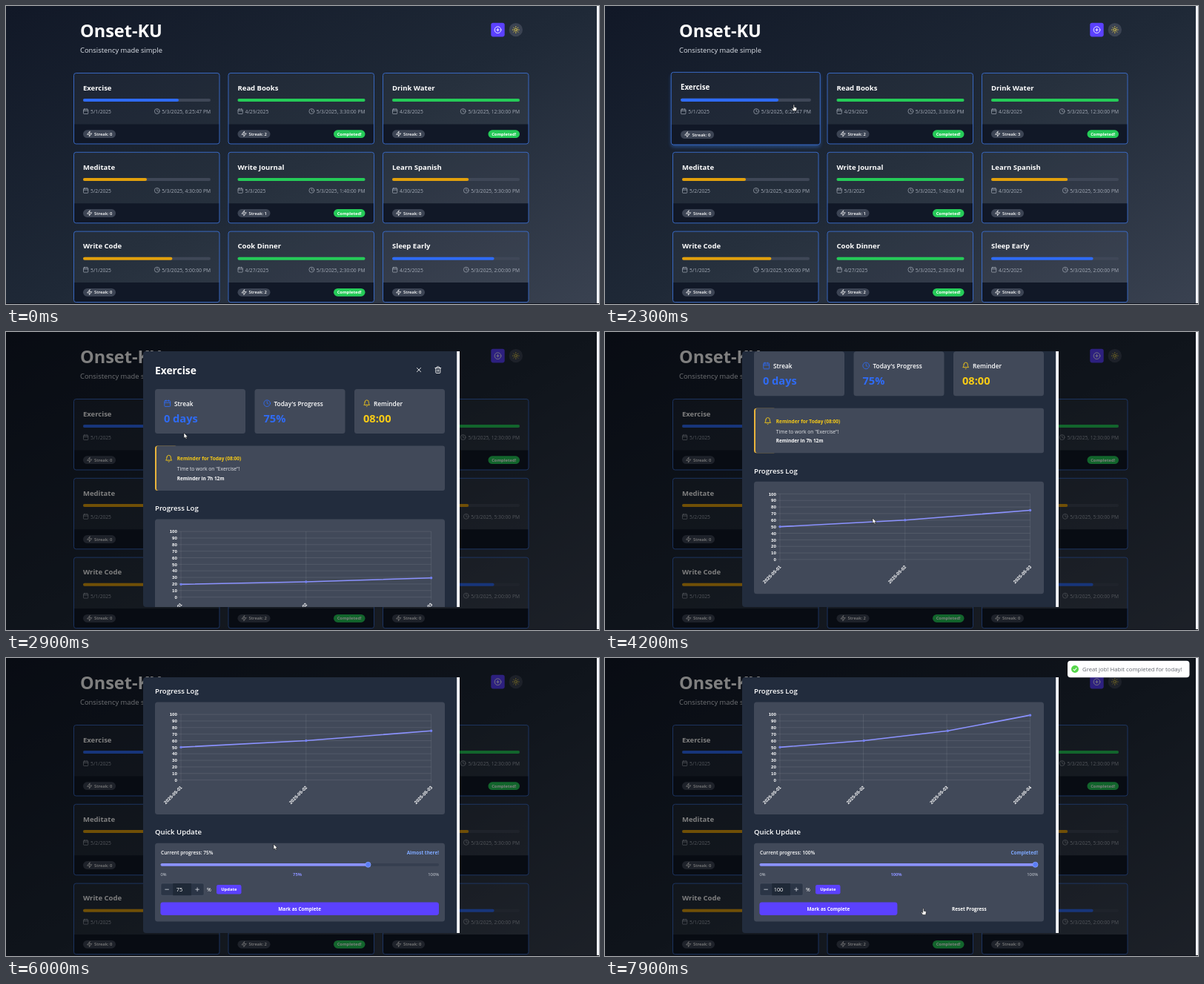
Write an HTML page that moves like this. It is 800 px wide and 402 px high and loops after 8 s.

```html
<!DOCTYPE html>
<html lang="en">
<head>
<meta charset="utf-8">
<title>Habit tracker</title>
<style>
html, body { margin: 0; width: 100%; height: 100%; overflow: hidden; background: #111827; }
#stage { position: relative; width: 800px; height: 402px; overflow: hidden; }
#page { position: absolute; width: 797px; height: 425px;
  background: linear-gradient(to bottom right, #111827, #1f2937 50%, #3b4352); }
svg { position: absolute; left: 0; top: 0; display: block; }
text { font-family: 'Open Sans', 'Noto Sans', sans-serif; white-space: pre; }
.axis text { font-family: 'Liberation Sans', Arial, sans-serif; }
</style>
</head>
<body>
<div id="stage"><div id="page"></div><svg id="art" width="800" height="402" viewBox="0 0 800 402"></svg></div>
<script>
const LOOP = 8000, OPEN = 2785, DONE = 7230, MAX_SCROLL = 193;
const WHITE = '#fff', BLUE = '#2f6bf5', GREEN = '#25cb58', AMBER = '#e2a00c',
  YELLOW = '#facc15', INDIGO = '#5b41ff', LILAC = '#8b92ff', PANEL = '#414959',
  GREY = '#a3aab6', INK = '#111827';

const ICONS = {
  calendar: '<rect x="3" y="4" width="18" height="18" rx="2"/><path d="M16 2v4M8 2v4M3 10h18"/>',
  clock: '<circle cx="12" cy="12" r="10"/><path d="M12 6v6l4 2"/>',
  zap: '<path d="M13 2 3 14h9l-1 8 10-12h-9z"/>',
  bell: '<path d="M6 8a6 6 0 0 1 12 0c0 7 3 9 3 9H3s3-2 3-9M10.3 21a2 2 0 0 0 3.4 0"/>',
  plus: '<circle cx="12" cy="12" r="10"/><path d="M8 12h8M12 8v8"/>',
  sun: '<circle cx="12" cy="12" r="4"/><path d="M12 2v2M12 20v2M5 5l1.4 1.4M17.6 17.6 19 19M2 12h2M20 12h2M5 19l1.4-1.4M17.6 6.4 19 5"/>',
  close: '<path d="M18 6 6 18M6 6l12 12"/>',
  trash: '<path d="M3 6h18M19 6v14a2 2 0 0 1-2 2H7a2 2 0 0 1-2-2V6M8 6V4a2 2 0 0 1 2-2h4a2 2 0 0 1 2 2v2M10 11v6M14 11v6"/>'
};

const icon = (name, x, y, size, color, weight = 2) =>
  `<g transform="translate(${x} ${y}) scale(${size / 24})" fill="none" stroke="${color}" stroke-width="${weight}" stroke-linecap="round" stroke-linejoin="round">${ICONS[name]}</g>`;
const box = (x, y, w, h, r, fill, extra = '') =>
  `<rect x="${x}" y="${y}" width="${w}" height="${h}" rx="${r}" fill="${fill}" ${extra}/>`;
const text = (x, y, size, fill, str, weight = 400, anchor = 'start', extra = '') =>
  `<text x="${x}" y="${y}" font-size="${size}" fill="${fill}" font-weight="${weight}" text-anchor="${anchor}" ${extra}>${str}</text>`;

/* Habit cards */
const habits = [
  ['Exercise', 75, '5/1/2025', '6:25:47', 0],
  ['Read Books', 100, '4/29/2025', '3:30:00', 2],
  ['Drink Water', 100, '4/28/2025', '12:30:00', 3],
  ['Meditate', 50, '5/2/2025', '4:30:00', 0],
  ['Write Journal', 100, '5/3/2025', '1:40:00', 1],
  ['Learn Spanish', 60, '4/30/2025', '5:30:00', 0],
  ['Write Code', 70, '5/1/2025', '5:00:00', 0],
  ['Cook Dinner', 100, '4/27/2025', '2:30:00', 2],
  ['Sleep Early', 80, '4/25/2025', '2:00:00', 0]
];

function card([name, pct, since, time, streak], i) {
  const x = 91.5 + (i % 3) * 208.5, y = 90.5 + Math.floor(i / 3) * 106.8;
  const color = pct === 100 ? GREEN : pct >= 75 ? BLUE : AMBER;
  const glow = i ? '' : `<g id="glow" clip-path="url(#outside)">${box(0, 3, 196.5, 95.5, 3, '#3b82f6', 'filter="url(#blur)" opacity=".75"')}</g>`;
  const done = pct < 100 ? '' : box(142, 76.8, 42.5, 10.8, 5.4, GREEN) +
    text(163.2, 84.3, 5.8, WHITE, 'Completed!', 700, 'middle');
  return `<g transform="translate(${x} ${y})"><g id="card${i}">${glow}
    ${box(0, 0, 196.5, 95.5, 3, WHITE, 'fill-opacity=".03"')}
    <path d="M0 69H196.5V92.5a3 3 0 0 1-3 3H3a3 3 0 0 1-3-3Z" fill="${INK}"/>
    ${box(0, 0, 196.5, 95.5, 3, 'none', 'stroke="#3b6fd0" stroke-width=".9"')}
    ${text(12.5, 23.4, 9.5, WHITE, name, 700)}
    ${box(12.5, 34.6, 172, 4, 2, '#3f4757')}${box(12.5, 34.6, 1.72 * pct, 4, 2, color)}
    ${icon('calendar', 12, 47.4, 8.3, GREY)}${text(22.6, 54.6, 6.7, GREY, since)}
    ${icon('clock', time.length > 7 ? 104 : 108.2, 47.4, 8.3, GREY)}
    ${text(184.5, 54.6, 6.7, GREY, `5/3/2025, ${time} PM`, 400, 'end')}
    ${box(12.5, 76.8, 44, 10.8, 5.4, '#3c4454')}${icon('zap', 17, 78, 8.3, WHITE)}
    ${text(27.6, 84.3, 5.8, WHITE, 'Streak: ' + streak, 600)}${done}</g></g>`;
}

const header = text(100, 42.3, 23.5, WHITE, 'Onset-KU', 700) +
  text(100, 63.4, 9.4, '#dfe3ea', 'Consistency made simple') +
  box(654.3, 22.8, 18.4, 18.6, 2.8, INDIGO) + icon('plus', 658.3, 27, 10.4, WHITE) +
  `<circle cx="687.8" cy="32.1" r="9.2" fill="#3b4352"/>` + icon('sun', 682.6, 26.9, 10.4, '#fde047');

/* Dialog */
const chartY = v => 357.6 - v * 0.885;
const chartX = (i, n) => 236 + 337.6 * i / (n - 1);

function axes(n) {
  let lines = '', labels = '';
  for (let v = 0; v <= 100; v += 10) {
    lines += `M232 ${chartY(v)}H573.6`;
    labels += text(231, chartY(v) + 2.2, 6.2, WHITE, v, 700, 'end');
  }
  for (let i = 0; i < n; i++) {
    const x = chartX(i, n);
    lines += `M${x} ${chartY(100)}V361.5`;
    labels += text(0, 0, 6.2, WHITE, '2025-05-0' + (i + 1), 700, 'end', `transform="translate(${x + 2} 368) rotate(-45)"`);
  }
  return `<path d="${lines}" stroke="#fff" stroke-opacity=".13" stroke-width=".7" fill="none"/>${labels}`;
}

function quickUpdate(pct, cheer) {
  const knob = 212.5 + 3.68 * pct, full = pct === 100, w = full ? 186 : 375.6;
  return text(209, 458.3, 6.6, WHITE, `Current progress: ${pct}%`, 600) +
    text(584, 458.3, 6.4, '#7fa9ff', cheer, 700, 'end') +
    box(208.5, 469.9, 375.6, 3.8, 1.9, '#363f50') + box(208.5, 469.9, knob - 208.5, 3.8, 1.9, LILAC) +
    `<circle cx="${knob}" cy="471.8" r="3.5" fill="#5b7df5" stroke="#7f9cff" stroke-width=".9"/>` +
    text(208.5, 487, 5.8, '#cdd2da', '0%') + text(393, 487, 5.8, LILAC, pct + '%', 700, 'middle') +
    text(584, 487, 5.8, '#cdd2da', '100%', 400, 'end') +
    box(209, 497, 58, 16.3, 2, '#2b3546', 'stroke="#4d5666" stroke-width=".5"') +
    box(225.3, 497, 24.6, 16.3, 0, '#1f2937') +
    `<path d="M214.4 505.2h5.4M255.4 505.2h5.4M258.1 502.5v5.4" stroke="#d5d9e0" stroke-width=".8"/>` +
    text(234, 508.2, 7.4, WHITE, pct, 400, 'middle') + text(271, 508, 7.1, WHITE, '%') +
    box(284, 499, 33.5, 12.6, 2.4, INDIGO) + text(300.8, 507.4, 5.8, WHITE, 'Update', 700, 'middle') +
    box(208.4, 522.4, w, 17.6, 3.4, INDIGO) +
    text(208.4 + w / 2, 533.6, 6.4, WHITE, 'Mark as Complete', 700, 'middle') +
    (full ? text(491.3, 533.6, 6.4, WHITE, 'Reset Progress', 700, 'middle') : '');
}

const stat = (x, name, color, label, value) => box(x, 77, 122, 60, 3.5, PANEL) +
  icon(name, x + 11.5, 91, 10.4, color) + text(x + 26, 99.6, 8.3, WHITE, label, 600) +
  text(x + 12, 122, 14.6, color, value, 700);

const dialog = `<g id="dialog">
  ${box(185, 26, 427, 345, 4, '#222c3d')}
  <g clip-path="url(#view)"><g id="content">
    ${text(201, 57, 13.8, WHITE, 'Exercise', 700)}
    ${icon('close', 551.8, 45.9, 10.4, WHITE)}${icon('trash', 577.6, 45.9, 10.4, WHITE)}
    ${stat(201, 'calendar', BLUE, 'Streak', '0 days')}
    ${stat(335.5, 'clock', BLUE, "Today's Progress", '75%')}
    ${stat(470, 'bell', YELLOW, 'Reminder', '08:00')}
    ${box(201, 153.5, 30, 60.5, 3.5, '#e9b43c')}${box(203, 153.5, 389, 60.5, 3, PANEL)}
    ${icon('bell', 214.2, 165.4, 10.8, YELLOW)}
    ${text(230.8, 173.4, 6.5, YELLOW, 'Reminder for Today (08:00)', 700)}
    ${text(230.8, 187.4, 6.7, '#e5e7eb', 'Time to work on "Exercise"!')}
    ${text(230.8, 199.8, 6.4, WHITE, 'Reminder in 7h 12m', 700)}
    ${text(201, 241.4, 9.6, WHITE, 'Progress Log', 600)}
    ${box(201, 252.5, 391, 151.5, 3.5, PANEL)}
    <g class="axis"><g id="axes3">${axes(3)}</g><g id="axes4">${axes(4)}</g></g>
    <path id="line" fill="none" stroke="${LILAC}" stroke-width="1.6" stroke-linejoin="round"/>
    <path id="dots" fill="none" stroke="#7380f0" stroke-width="3.4" stroke-linecap="round"/>
    ${text(201, 431.4, 9.6, WHITE, 'Quick Update', 600)}
    ${box(201, 442.8, 391, 105.6, 3.5, PANEL)}
    <g id="before">${quickUpdate(75, 'Almost there!')}</g>
    <g id="after">${quickUpdate(100, 'Completed!')}</g>
  </g></g>
  ${box(608.2, 26, 3.8, 345, 0, '#f8f9fd')}</g>`;

const loader = `<g id="loader">${box(185, 126, 427, 161, 4, '#222c3d')}
  <circle id="spin" cx="399" cy="207" r="15" fill="none" stroke="${BLUE}" stroke-width="1.4" stroke-dasharray="70 24.2"/></g>`;

const toast = `<g id="toast">${box(624, 3.8, 164.5, 22.4, 4, WHITE)}
  <g id="tick"><circle r="5" fill="#55d64a"/><path d="M-2.2 .2-.6 1.8 2.3-1.6" fill="none" stroke="#fff" stroke-width="1.1"/></g>
  ${text(644, 17.9, 7.75, '#62666e', 'Great job! Habit completed for today!')}</g>`;

const cursor = `<g id="cursor" stroke="#000" stroke-width=".5" fill="#fff" stroke-linejoin="round">
  <path id="arrow" d="M0 0V7.3L1.7 5.8 2.8 8.2 4 7.7 3 5.4H5.2Z"/>
  <path id="hand" d="M-.7 .5a.7.7 0 0 1 1.4 0V3.2L3.2 3.8Q3.9 4 3.8 4.8L3.2 8.4H-.8L-2.8 5.4Q-2.9 4.4-1.9 4.8L-.7 5.7Z"/></g>`;

document.getElementById('art').innerHTML = `<defs>
  <clipPath id="view"><rect x="185" y="26" width="423.2" height="345"/></clipPath>
  <clipPath id="outside"><path clip-rule="evenodd" d="M-30-30H230V130H-30ZM0 0V95.5H196.5V0Z"/></clipPath>
  <filter id="blur" x="-20%" y="-30%" width="140%" height="160%"><feGaussianBlur stdDeviation="2.6"/></filter></defs>
  ${header}${habits.map(card).join('')}
  ${box(0, 0, 797, 402, 0, '#000', 'id="shade"')}${loader}${dialog}
  ${box(797, 0, 3, 402, 0, '#f3f5fd')}${box(0, 401, 800, 1, 0, '#10131c')}${toast}${cursor}`;

/* Motion */
const $ = id => document.getElementById(id);
const set = (id, name, value) => $(id).setAttribute(name, value);
const show = (id, on) => set(id, 'display', on ? 'inline' : 'none');
const part = (t, from, span) => Math.min(1, Math.max(0, (t - from) / span));
const smooth = p => p * p * (3 - 2 * p);
const quartOut = p => 1 - (1 - p) ** 4;

function along(keys, t) {
  let a = keys[0];
  for (const b of keys) {
    if (t < b[0]) {
      const p = smooth(part(t, a[0], b[0] - a[0]));
      return a.slice(1).map((v, i) => v + (b[i + 1] - v) * p);
    }
    a = b;
  }
  return a.slice(1);
}

const pointer = [[0, 806, 250], [100, 806, 250], [900, 726, 74], [1000, 726, 74], [1300, 697, 44],
  [1700, 690, 48], [1900, 690, 48], [2350, 240, 136], [2950, 240, 136], [3700, 361, 247],
  [3800, 361, 251], [6400, 361, 251], [7200, 429.5, 338]];
const scroll = [[0, 0], [3960, 0], [4450, 104], [4760, 104], [5200, MAX_SCROLL]];
const hover = [[0, 0], [2180, 0], [2400, 1], [2620, 1], [2840, 0]];
const values = [50, 60, 75, 100];

function drawChart(t, done) {
  const rise = quartOut(part(t, OPEN, 1000)), shift = quartOut(part(t, DONE, 1000));
  const pts = values.slice(0, done ? 4 : 3).map((v, i) => {
    const x = i < 3 ? chartX(i, 3) + (chartX(i, 4) - chartX(i, 3)) * shift : chartX(3, 4);
    return x + ' ' + chartY(v * (i < 3 ? rise : shift));
  });
  set('line', 'd', 'M' + pts.join('L'));
  set('dots', 'd', pts.map(p => `M${p}h.01`).join(''));
}

function draw(t) {
  const done = t >= DONE, open = t >= OPEN;
  const [lift] = along(hover, t), grow = 1 + 0.04 * lift;
  set('card0', 'transform', `translate(98.25 47.75) scale(${grow}) translate(-98.25 -47.75)`);
  set('glow', 'opacity', lift);
  set('shade', 'opacity', 0.5 * part(t, 2330, 150));
  show('loader', !open && t > 2400);
  set('loader', 'opacity', smooth(part(t, 2440, 300)));
  set('spin', 'transform', `rotate(${t * 0.36} 399 207)`);

  show('dialog', open);
  set('content', 'transform', `translate(0 ${-along(scroll, t)[0]})`);
  drawChart(t, done);
  show('axes3', !done);
  show('axes4', done);
  show('before', !done);
  show('after', done);

  const slide = 1 - (1 - part(t, DONE + 30, 350)) ** 3, size = 0.6 + 0.4 * slide;
  show('toast', t > DONE + 30);
  set('toast', 'opacity', 0.5 + 0.5 * slide);
  set('toast', 'transform', `translate(706 ${15 - 44.8 * (1 - slide)}) scale(${size}) translate(-706 -15)`);
  set('tick', 'transform', `translate(634 15) scale(${quartOut(part(t, DONE + 130, 300))})`);

  const [x, y] = along(pointer, t), hand = y > 329 && x < 600 || (t > 2200 && t < 2340 && x < 288);
  set('cursor', 'transform', `translate(${x} ${y})`);
  show('cursor', t > 100);
  show('arrow', !hand);
  show('hand', hand);
}

function tick() {
  draw(performance.now() % LOOP);
  requestAnimationFrame(tick);
}
tick();
</script>
</body>
</html>
```
